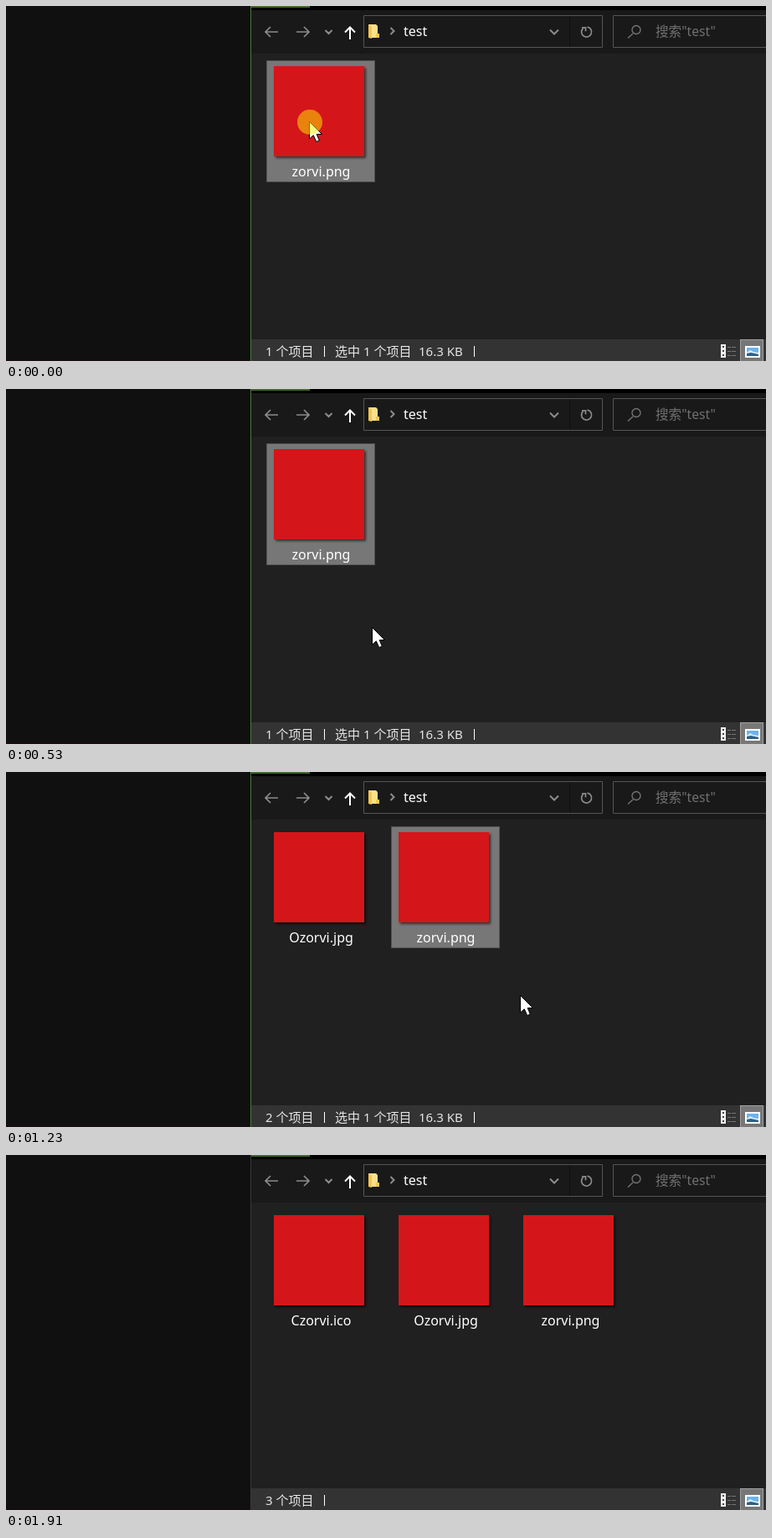
Recreate the animation shown at these times as an HTML page. Size 908x425 px, loop 1980 ms.

```html
<!DOCTYPE html>
<html lang="zh-CN">
<head>
<meta charset="utf-8">
<title>File menu</title>
<style>
html, body { margin: 0; width: 100%; height: 100%; overflow: hidden; background: #101010; }
svg { display: block; width: 908px; height: 425px; }
text { font: 15px "Noto Sans", "Noto Sans CJK SC", "Noto Sans CJK", sans-serif; fill: #fff; white-space: pre; }
.label text, .path { font-size: 16px; }
.label text { text-anchor: middle; }
.search { font-size: 15.6px; fill: #707070; }
.bold { font-weight: 700; }
.status text { fill: #e6e6e6; }
.line { fill: none; stroke: #8c8c8c; stroke-width: 1.7; }
.panel { fill: #2b2b2b; stroke: #a0a0a0; }
.arrow { fill: none; stroke: currentColor; stroke-width: 1.3; }
.shade { filter: drop-shadow(2px 2px 1.5px rgba(0, 0, 0, .6)); }

.t { animation: 1980ms step-end infinite; }
#edge { animation-name: edge; }
#picked, #pickedInfo { animation-name: picked; }
#png { animation-name: png; }
#jpg { animation-name: jpg; }
#ico, #n3 { animation-name: third; }
#n1 { animation-name: first; }
#n2 { animation-name: second; }
#menu { animation-name: menu; }
#sub { animation-name: sub; }
#hover { animation-name: hover; }
#cursor { animation-name: cursor; }
#click { animation-name: click; }

@keyframes edge { 0% { fill: #4c7440; } 96.46%, 100% { fill: #383838; } }
@keyframes picked { 0% { opacity: 1; } 96.46%, 100% { opacity: 0; } }
@keyframes png {
  0% { transform: translate(0, 0); }
  35.35% { transform: translate(149px, 0); }
  69.69%, 100% { transform: translate(298px, 0); }
}
@keyframes jpg {
  0% { opacity: 0; transform: translate(0, 0); }
  35.35% { opacity: 1; transform: translate(0, 0); }
  69.69%, 100% { opacity: 1; transform: translate(149px, 0); }
}
@keyframes first { 0% { opacity: 1; } 35.35%, 100% { opacity: 0; } }
@keyframes second { 0% { opacity: 0; } 35.35% { opacity: 1; } 69.69%, 100% { opacity: 0; } }
@keyframes third { 0% { opacity: 0; } 69.69%, 100% { opacity: 1; } }
@keyframes menu {
  0% { opacity: 0; transform: translate(0, 0); color: #b9e6fa; }
  3.53% { opacity: 1; transform: translate(0, 0); color: #b9e6fa; }
  26.76% { opacity: 0; transform: translate(0, 0); color: #b9e6fa; }
  38.88% { opacity: 1; transform: translate(178px, 5px); color: #ffd9c4; }
  62.12%, 100% { opacity: 0; transform: translate(178px, 5px); color: #ffd9c4; }
}
@keyframes sub {
  0% { opacity: 0; }
  11.1% { opacity: 1; }
  26.76% { opacity: 0; }
  42.92% { opacity: 1; }
  62.12%, 100% { opacity: 0; }
}
@keyframes hover {
  0% { opacity: 0; transform: translate(0, 0); }
  15.15% { opacity: 1; transform: translate(0, 0); }
  42.92%, 100% { opacity: 1; transform: translate(0, 28px); }
}
@keyframes cursor {
  0% { opacity: 1; transform: translate(363px, 139px); }
  7.57% { opacity: 1; transform: translate(345px, 225px); }
  11.1% { opacity: 1; transform: translate(338px, 296px); }
  15.15% { opacity: 1; transform: translate(430px, 295px); }
  26.76% { opacity: 1; transform: translate(438px, 286px); }
  30.8% { opacity: 1; transform: translate(492px, 214px); }
  35.35% { opacity: 1; transform: translate(541px, 151px); }
  38.88% { opacity: 1; transform: translate(541px, 144px); }
  42.92% { opacity: 1; transform: translate(587px, 324px); }
  46.96% { opacity: 1; transform: translate(587px, 331px); }
  62.12% { opacity: 1; transform: translate(615px, 268px); }
  65.65% { opacity: 1; transform: translate(619px, 265px); }
  69.69% { opacity: 1; transform: translate(622px, 262px); }
  73.73% { opacity: 1; transform: translate(627px, 296px); }
  77.27% { opacity: 1; transform: translate(636px, 362px); }
  80.8%, 100% { opacity: 0; transform: translate(636px, 425px); }
}
@keyframes click {
  0% { opacity: .5; }
  3.53% { opacity: 0; }
  22.72% { opacity: .5; }
  26.76% { opacity: 0; }
  50.5% { opacity: .5; }
  54.54%, 100% { opacity: 0; }
}
</style>
</head>
<body>
<svg viewBox="0 0 908 425">
  <defs>
    <rect id="thumb" x="320" y="72" width="108" height="108" fill="#d4161a"/>
    <path id="more" class="arrow" d="M340.5 -8l8.5 8-8.5 8"/>
  </defs>

  <!-- window -->
  <rect width="908" height="425" fill="#101010"/>
  <rect y="424" width="292" height="1" fill="#1d0b0e"/>
  <rect x="292" width="616" height="5" fill="#000"/>
  <rect x="293" y="5" width="615" height="52" fill="#191919"/>
  <rect x="293" y="57" width="615" height="342" fill="#202020"/>
  <rect x="293" y="399" width="615" height="26" fill="#333"/>
  <rect x="293" width="70" height="2" fill="#41692f"/>
  <rect id="edge" class="t" x="292" width="1" height="425"/>

  <!-- navigation -->
  <g class="line">
    <path d="M325 31H310M316 25l-6 6 6 6M347 31h15M356 25l6 6-6 6"/>
    <path d="M381.5 29l4 4 4-4M459.5 26l4 4-4 4M650 28.5l5 5 5-5" stroke-width="2"/>
    <path d="M411 40V26M405 31.500l6-6 6 6" stroke="#fff" stroke-width="2"/>
    <path d="M427.5 11.5h285v38h-285zM920 11.5H725.5v38H920" stroke="#555" stroke-width="1"/>
    <path d="M673.5 12v37" stroke="#101010" stroke-width="1"/>
    <path d="M689.3 26.8a6 6 0 1 0 5.2-1.700M688 25.800h4.500v4.500"/>
    <path d="M749 33l-6 5.500" stroke="#777" stroke-width="1.3"/>
    <circle cx="753" cy="28.5" r="5" stroke="#777" stroke-width="1.3"/>
  </g>
  <path d="M433 22h9l2 2v14h-11z" fill="#ffe08a"/>
  <path d="M433 22l4 3v14l-4-1zM442 33h4v5h-4z" fill="#f4c74f"/>
  <text class="path" x="475" y="36">test</text>
  <text class="search" x="776" y="36">搜索"test"</text>

  <!-- files -->
  <g class="label">
    <g id="ico" class="t">
      <use href="#thumb" class="shade"/>
      <text x="376.5" y="204">Czorvi.ico</text>
    </g>
    <g id="jpg" class="t">
      <use href="#thumb" class="shade"/>
      <text x="376.5" y="204">Ozorvi.jpg</text>
    </g>
    <g id="png" class="t">
      <rect id="picked" class="t" x="311.5" y="65.5" width="129" height="145" fill="#777" stroke="#525252"/>
      <use href="#thumb" class="shade"/>
      <text x="376.5" y="204">zorvi.png</text>
    </g>
  </g>

  <!-- status bar -->
  <g class="status">
    <text id="n1" class="t" x="310" y="419">1 个项目</text>
    <text id="n2" class="t" x="310" y="419">2 个项目</text>
    <text id="n3" class="t" x="310" y="419">3 个项目</text>
    <path d="M380.5 407v13" stroke="#fff"/>
    <g id="pickedInfo" class="t">
      <text x="393" y="419">选中 1 个项目</text>
      <text x="493" y="419">16.3 KB</text>
      <path d="M559.5 407v13" stroke="#fff"/>
    </g>
    <rect x="854" y="405" width="6" height="16" fill="#f0f0f0"/>
    <path d="M857 407v2m0 3v2m0 3v2" stroke="#444" stroke-width="2"/>
    <path d="M862 408.5h4m1 0h5M862 413.5h4m1 0h5M862 418.5h4m1 0h5" stroke="#777"/>
    <rect x="877.5" y="399.5" width="27" height="26" fill="#777" stroke="#a0a0a0"/>
    <rect x="883" y="407" width="18" height="14" fill="#fff"/>
    <rect x="885" y="409" width="14" height="10" fill="#6db3ee"/>
    <path d="M885 415l4-3 4 2 6 1v2h-14z" fill="#d9ecfa"/>
    <path d="M885 419v-3l5-1 9 2v2z" fill="#2b5f86"/>
  </g>

  <!-- context menu -->
  <g id="menu" class="t">
    <rect class="panel" x="4.5" y="139.5" width="358" height="300"/>
    <rect x="7" y="285" width="350" height="28" fill="#414141"/>
    <path d="M17 317.5h333M17 382.5h333" stroke="#808080"/>
    <circle cx="27" cy="271" r="9.5" fill="#2495dc"/>
    <text class="bold" x="47" y="164">打开(O)</text>
    <text x="47" y="193">设置为桌面背景(B)</text>
    <text x="47" y="221">编辑(E)</text>
    <text x="47" y="249">打印(P)</text>
    <text x="47" y="277">通过 Dorb 打开</text>
    <text x="47" y="305">图片处理</text>
    <text x="47" y="342">向右旋转(T)</text>
    <text x="47" y="370">向左旋转(L)</text>
    <text x="47" y="407">播放到设备</text>
    <use href="#more" y="299"/>
    <use href="#more" y="401"/>
    <g id="sub" class="t">
      <rect class="panel" x="357.5" y="282.5" width="206" height="67"/>
      <rect id="hover" class="t" x="360" y="288" width="201" height="28" fill="#414141"/>
      <text x="400" y="308">压缩图片</text>
      <text x="400" y="336">转换为ico</text>
    </g>
  </g>

  <!-- pointer -->
  <g id="cursor" class="t">
    <path d="M-.5 -.5V20L4.300 15.800 7.700 23.500 11.300 22 8.200 14.500H14.500z" fill="#fff" stroke="#000"/>
    <circle id="click" class="t" r="15" fill="#fff000"/>
  </g>
</svg>
</body>
</html>
```
